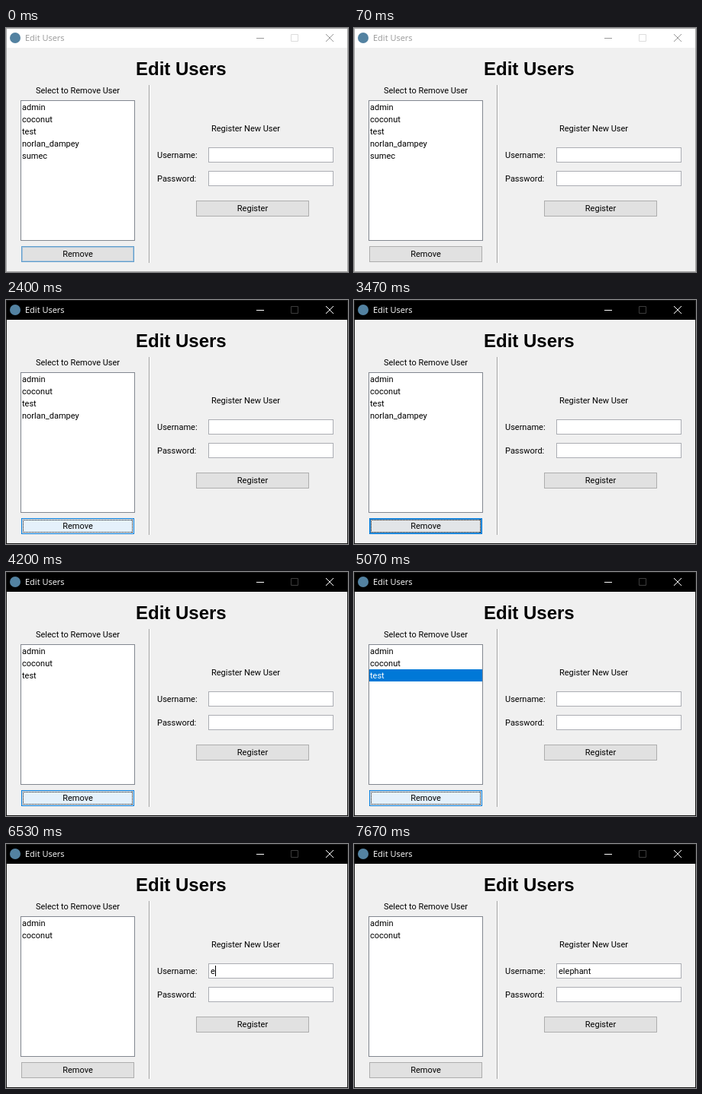
An HTML page that plays this animation: 448x321 px, repeating every 8000 ms.

```html
<!DOCTYPE html>
<html lang="en">
<head>
<meta charset="utf-8">
<title>Edit Users</title>
<style>
* { box-sizing: border-box; }
html, body { margin: 0; width: 100%; height: 100%; overflow: hidden; }
body { font: 11px/16px Roboto, sans-serif; color: #000; }
body * { position: absolute; white-space: nowrap; }

.window { left: 0; top: 0; width: 448px; height: 321px; overflow: hidden; background: #f0f0f0; }
.bar { left: 0; top: 0; width: 448px; height: 26px; animation: bar 8s step-end infinite; }
.edge { inset: 0; border: 1px solid; animation: edge 8s step-end infinite; }
.icon { left: 5px; top: 6px; width: 14px; height: 14px; border-radius: 50%; background: #5382a1; }
.caption { left: 25px; top: 5px; font: 11px/16px "Open Sans", sans-serif; }
.controls { left: 320px; top: 0; fill: none; stroke: currentColor; }
.max { animation: max 8s step-end infinite; }

h1 { left: 170px; top: 40px; margin: 0; font: bold 24px/28px "Liberation Sans", sans-serif; }
.rule { left: 187px; top: 75px; width: 2px; height: 234px; background: #a0a0a0; border-right: 1px solid #fff; }

.list { left: 19px; top: 95px; width: 150px; height: 185px; background: #fff; border: 1px solid #828790; }
.row { position: relative; height: 16px; line-height: 18px; padding-left: 1px; animation: 8s step-end infinite; }
.row:nth-child(3) { animation-name: third; }
.row:nth-child(4) { animation-name: fourth; }
.row:nth-child(5) { animation-name: fifth; }

.field { left: 265px; width: 164px; height: 20px; background: #fff; border: 1px solid #abadb3; }
.button { width: 148px; height: 21px; line-height: 19px; text-align: center; background: #e1e1e1; border: 1px solid #adadad; }
.remove { left: 20px; top: 287px; animation: button 8s linear infinite; }
.focus {
  --across: repeating-linear-gradient(90deg, #000 0 1px, #0000 1px 2px);
  --down: repeating-linear-gradient(#000 0 1px, #0000 1px 2px);
  inset: 1px;
  background: var(--across) top / 100% 1px, var(--across) bottom / 100% 1px,
    var(--down) left / 1px 100%, var(--down) right / 1px 100%;
  background-repeat: no-repeat;
  animation: focus 8s step-end infinite;
}

.typed { left: 2px; top: 2px; height: 16px; display: flex; --n: 0; animation: type 8s step-end infinite; }
.typed span { position: static; font-size: calc(min(1, max(0, var(--n) - var(--i))) * 11px); }
.caret { position: static; width: 1px; height: 14px; background: #000; animation: caret 8s step-end infinite; }

@keyframes bar {
  0% { background: #fff; color: #999; }
  21.58%, 100% { background: #000; color: #fff; }
}
@keyframes edge {
  0% { border-color: #a5a5a5; }
  21.58%, 100% { border-color: #181818; }
}
@keyframes max {
  0% { stroke: #ddd; }
  21.58%, 100% { stroke: #3c3c3c; }
}
@keyframes third {
  0% { background: #fff; color: #000; visibility: visible; }
  56.6% { background: #0078d7; color: #fff; visibility: visible; }
  65%, 100% { background: #fff; color: #000; visibility: hidden; }
}
@keyframes fourth {
  0% { background: #fff; color: #000; visibility: visible; }
  45.8% { background: #0078d7; color: #fff; visibility: visible; }
  50.8%, 100% { background: #fff; color: #000; visibility: hidden; }
}
@keyframes fifth {
  0% { background: #fff; color: #000; visibility: visible; }
  21.58% { background: #0078d7; color: #fff; visibility: visible; }
  24.1%, 100% { background: #fff; color: #000; visibility: hidden; }
}
/* normal, hot, pressed and default looks, cross-faded */
@keyframes button {
  0%, .82% { background: #e1e1e1; border-color: #5f9dcd; box-shadow: inset 0 0 0 1px #a9c5dc; }
  .83%, 21.57% { background: #e1e1e1; border-color: #adadad; box-shadow: inset 0 0 0 1px #e1e1e1; }
  21.58%, 22.4% { background: #e5f1fb; border-color: #0078d7; box-shadow: inset 0 0 0 1px #e5f1fb; }
  24.1% { background: #cce4f7; border-color: #005499; box-shadow: inset 0 0 0 1px #cce4f7; }
  30%, 36.7% { background: #e5f1fb; border-color: #0078d7; box-shadow: inset 0 0 0 1px #e5f1fb; }
  45.8% { background: #e1e1e1; border-color: #0078d7; box-shadow: inset 0 0 0 1px #0078d7; }
  48.3% { background: #e1e1e1; border-color: #6996bd; box-shadow: inset 0 0 0 1px #a0bfd8; }
  50% { background: #e5f1fb; border-color: #0078d7; box-shadow: inset 0 0 0 1px #e5f1fb; }
  50.9% { background: #cce4f7; border-color: #005499; box-shadow: inset 0 0 0 1px #cce4f7; }
  52.2%, 53.4% { background: #e5f1fb; border-color: #0078d7; box-shadow: inset 0 0 0 1px #e5f1fb; }
  56.6% { background: #e3e9ee; border-color: #0078d7; box-shadow: inset 0 0 0 1px #73b5e9; }
  60% { background: #e1e1e1; border-color: #adadad; box-shadow: inset 0 0 0 1px #e1e1e1; }
  61.6%, 63.4% { background: #e5f1fb; border-color: #0078d7; box-shadow: inset 0 0 0 1px #e5f1fb; }
  64.4% { background: #cce4f7; border-color: #005499; box-shadow: inset 0 0 0 1px #cce4f7; }
  66.2% { background: #e5f1fb; border-color: #0078d7; box-shadow: inset 0 0 0 1px #e5f1fb; }
  70% { background: #e1e1e1; border-color: #0078d7; box-shadow: inset 0 0 0 1px #0078d7; }
  73.3%, 100% { background: #e1e1e1; border-color: #adadad; box-shadow: inset 0 0 0 1px #e1e1e1; }
}
@keyframes focus {
  0%, 45.8%, 56.6%, 70%, 100% { visibility: hidden; }
  21.58%, 50%, 62% { visibility: visible; }
}
@keyframes type {
  0% { --n: 0; }
  80.8% { --n: 1; }
  82.4% { --n: 2; }
  83.3% { --n: 3; }
  84.1% { --n: 4; }
  85.8% { --n: 5; }
  87.4% { --n: 6; }
  88.3% { --n: 7; }
  89.9%, 100% { --n: 8; }
}
@keyframes caret {
  0%, 76.6%, 95.8%, 100% { visibility: hidden; }
  70.8%, 80.8% { visibility: visible; }
}
</style>
</head>
<body>
<div class="window">
  <div class="bar">
    <div class="icon"></div>
    <div class="caption">Edit Users</div>
    <svg class="controls" width="128" height="26">
      <path d="M8 13.5h10M99 8l10 10M109 8l-10 10"/>
      <path class="max" d="M53.5 8.5h9v9h-9z"/>
    </svg>
  </div>
  <h1>Edit Users</h1>
  <div style="left:39px;top:75px">Select to Remove User</div>
  <div class="list">
    <div class="row">admin</div>
    <div class="row">coconut</div>
    <div class="row">test</div>
    <div class="row">norlan_dampey</div>
    <div class="row">sumec</div>
  </div>
  <div class="button remove">Remove<div class="focus"></div></div>
  <div class="rule"></div>
  <div style="left:269px;top:125px">Register New User</div>
  <div style="left:198px;top:160px">Username:</div>
  <div class="field" style="top:157px">
    <div class="typed"><span style="--i:0">e</span><span style="--i:1">l</span><span style="--i:2">e</span><span style="--i:3">p</span><span style="--i:4">h</span><span style="--i:5">a</span><span style="--i:6">n</span><span style="--i:7">t</span><i class="caret"></i></div>
  </div>
  <div style="left:198px;top:191px">Password:</div>
  <div class="field" style="top:188px"></div>
  <div class="button" style="left:249px;top:227px">Register</div>
  <div class="edge"></div>
</div>
</body>
</html>
```
